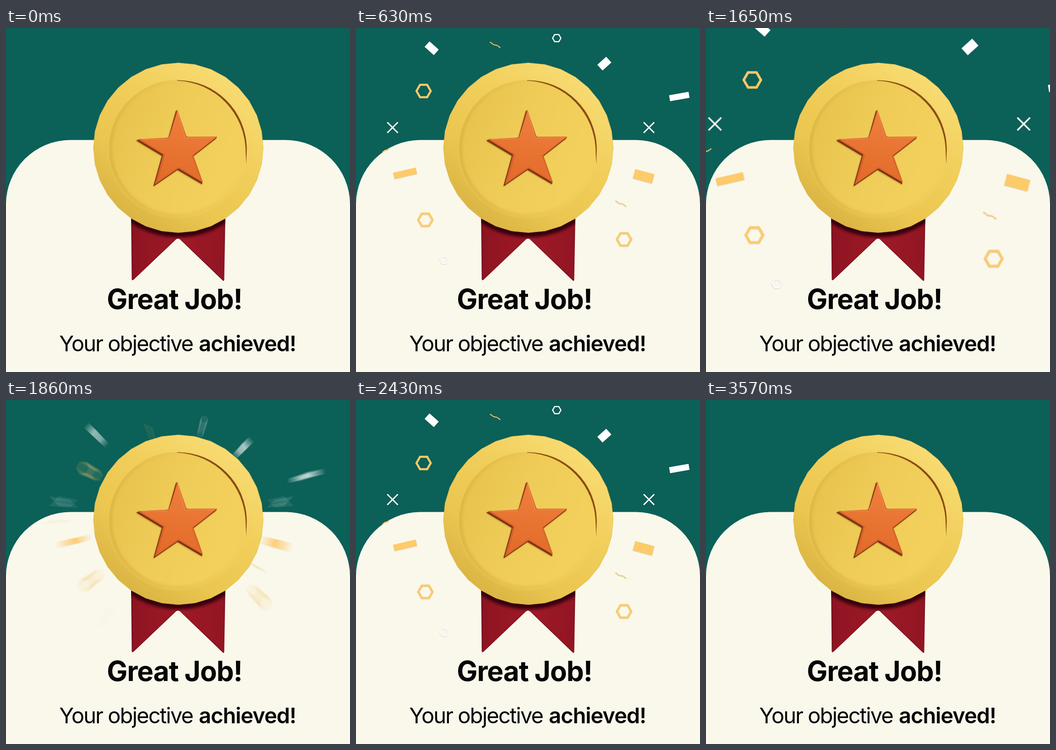
An HTML page with a canvas that plays this animation: 748 by 748 pixels, repeating every 3.6 s.

```html
<!DOCTYPE html>
<html lang="en">
<head>
<meta charset="utf-8">
<title>Great Job!</title>
<style>
  html, body { margin: 0; width: 100%; height: 100%; overflow: hidden; background: #0b6058; }
  canvas, svg { position: absolute; left: 0; top: 0; display: block; }
  text { font-family: Inter, "Liberation Sans", sans-serif; font-optical-sizing: none; fill: #050505; }
  .title { font-size: 60px; font-weight: 700; letter-spacing: -.018em; text-anchor: middle; }
  .line { font-size: 47px; letter-spacing: -.041em; }
  .strong { font-size: 47px; font-weight: 600; letter-spacing: -.024em; text-anchor: end; }
</style>
</head>
<body>
<svg width="748" height="748" viewBox="0 0 748 748">
  <rect y="243.600" width="748" height="700" rx="140" fill="#faf8eb"/>
</svg>
<canvas id="stage" width="748" height="748"></canvas>
<svg width="748" height="748" viewBox="0 0 748 748">
  <defs>
    <linearGradient id="rim" x1=".9" y1=".2" x2=".3" y2="1">
      <stop offset="0" stop-color="#f7da70"/>
      <stop offset=".35" stop-color="#f1ce5a"/>
      <stop offset=".7" stop-color="#ebc650"/>
      <stop offset="1" stop-color="#dab443"/>
    </linearGradient>
    <linearGradient id="floor" x1=".05" y1=".3" x2=".85" y2=".6">
      <stop offset="0" stop-color="#e8c44e"/>
      <stop offset=".5" stop-color="#efcc57"/>
      <stop offset="1" stop-color="#f2d05b"/>
    </linearGradient>
    <linearGradient id="lip" x1="0" y1=".7" x2="1" y2=".3">
      <stop offset="0" stop-color="#d2a536"/>
      <stop offset=".45" stop-color="#d9b040" stop-opacity=".6"/>
      <stop offset="1" stop-color="#f3d062" stop-opacity="0"/>
    </linearGradient>
    <linearGradient id="face" x1=".6" y1="0" x2=".4" y2="1">
      <stop offset="0" stop-color="#ee7f3c"/>
      <stop offset="1" stop-color="#e36b2a"/>
    </linearGradient>
    <linearGradient id="tailL" x1="272" x2="375" gradientUnits="userSpaceOnUse">
      <stop offset="0" stop-color="#6d0d1a"/>
      <stop offset=".05" stop-color="#8e1422"/>
      <stop offset="1" stop-color="#9e1926"/>
    </linearGradient>
    <linearGradient id="tailR" x1="375" x2="477" gradientUnits="userSpaceOnUse">
      <stop offset="0" stop-color="#a01a27"/>
      <stop offset=".96" stop-color="#921523"/>
      <stop offset="1" stop-color="#690c18"/>
    </linearGradient>
    <filter id="soft"><feGaussianBlur stdDeviation="3"/></filter>
    <filter id="fine"><feGaussianBlur stdDeviation=".9"/></filter>
    <path id="ribbon" d="M272 405H477L474.500 548Q474 551 471.500 549L380 461Q374 455 368 461L277 547.500Q273.500 550 273.400 546Z"/>
    <clipPath id="ribbonClip"><use href="#ribbon"/></clipPath>
    <path id="star" d="M372.500 178L391 233Q392 237 396 237L459 236.500L407 277L428 336L375 305L324 340L342 275L287 242L350 239Q355 238 357 233Z" stroke-linejoin="round"/>
  </defs>

  <g clip-path="url(#ribbonClip)">
    <path d="M270 400H375V555H270Z" fill="url(#tailL)"/>
    <path d="M374.500 400H480V555H374.500Z" fill="url(#tailR)"/>
    <path d="M368 461L277 548M380 461L473 550" fill="none" stroke="#6b0d1a" stroke-width="2"/>
    <circle cx="375" cy="268" r="187" fill="#35040d" filter="url(#soft)"/>
  </g>

  <polygon id="disc" fill="url(#rim)" stroke="#d9b243" stroke-width=".6"/>
  <circle cx="373" cy="262" r="149" fill="url(#floor)"/>
  <circle cx="373" cy="262" r="146" fill="none" stroke="url(#lip)" stroke-width="4" filter="url(#soft)"/>
  <circle cx="373" cy="262" r="151" fill="none" stroke="#f5d768" stroke-opacity=".35" stroke-width="3" filter="url(#fine)"/>
  <path d="M372 113.600A150 150 0 0 1 523.500 264L522.500 297L521 268A155 155 0 0 0 372 114.500Z" fill="#8a4c14"/>

  <use href="#star" x="-3" y="4" fill="#80521a" stroke="#80521a" stroke-width="2" opacity=".5" filter="url(#fine)"/>
  <use href="#star" x="-2" y="2.500" fill="#7d2f10" stroke="#7d2f10" stroke-width="2"/>
  <use href="#star" fill="#d5622a" stroke="#d5622a" stroke-width=".8"/>
  <path d="M373 182L390 239L455 238L404 278L425 333L375 302L330 334L346 275L294 243L353 241Z" fill="url(#face)"/>
  <path d="M373 181L390 239L456 238M294 242L353 241" fill="none" stroke="#f59c62" stroke-width="1.600" stroke-opacity=".7"/>

  <text class="title" x="366.500" y="611">Great Job!</text>
  <text class="line" x="115.800" y="703">Your objective</text>
  <text class="strong" x="630.500" y="703">achieved!</text>
</svg>
<script>
const SIZE = 748, CX = 374, CY = 255, PERIOD = 1800;
const GOLD = '#fdcb6a', WHITE = '#fff';
const ctx = document.getElementById('stage').getContext('2d');

function layer() {
  const c = document.createElement('canvas');
  c.width = c.height = SIZE;
  return c;
}

const ring = (n, r, x, y, start = 0) => Array.from({ length: n }, (_, i) => {
  const a = start + i * 2 * Math.PI / n;
  return [x + r * Math.cos(a), y + r * Math.sin(a)];
});

document.getElementById('disc').setAttribute('points', ring(32, 184.7, 374.7, 260.4, -Math.PI / 2).join(' '));

// All confetti at rest, drawn once.
const confetti = layer(), g = confetti.getContext('2d');
g.shadowColor = 'rgba(40,40,40,.25)';
g.shadowBlur = 1.5;
g.shadowOffsetX = -0.3;
g.shadowOffsetY = 0.6;

function slip(x, y, w, h, deg, color) {
  g.save();
  g.translate(x, y);
  g.rotate(deg * Math.PI / 180);
  g.fillStyle = color;
  g.fillRect(-w / 2, -h / 2, w, h);
  g.restore();
}

function line(path, color, width) {
  g.strokeStyle = color;
  g.lineWidth = width;
  g.stroke(path);
}

function hex(x, y, r, width, color) {
  const p = new Path2D();
  ring(6, r, x, y).forEach(q => p.lineTo(...q));
  p.closePath();
  line(p, color, width);
}

function cross(x, y) {
  const d = 11.5;
  line(new Path2D(`M${x - d} ${y - d}l23 23M${x + d} ${y - d}l-23 23`), WHITE, 3);
}

function squiggle(x, y, w, h) {
  line(new Path2D(`M${x} ${y}c${w * .2} 0 ${w * .25} ${h * .55} ${w * .5} ${h * .5}s${w * .35} ${h * .4} ${w * .5} ${h * .5}`), GOLD, 2);
}

slip(164.5, 44, 27, 16, 42, WHITE);
slip(540, 77.5, 26, 17, -42, WHITE);
slip(703, 149, 43, 13, -10, WHITE);
slip(107, 316, 50, 14, -13, GOLD);
slip(625.5, 322.5, 43, 21, 15, GOLD);
hex(147, 137, 15.5, 4.5, GOLD);
hex(151, 417, 15.5, 4.5, GOLD);
hex(583, 459.5, 15.5, 4.5, GOLD);
hex(436.5, 22, 9, 2.5, WHITE);
hex(192, 504.5, 8.7, 2.5, WHITE);
cross(79.5, 216.5);
cross(637, 216.5);
squiggle(291, 31, 23, 12);
squiggle(564, 376, 24, 12);
squiggle(57, 270, 16, -9);

function elastic(u) {
  if (u <= 0) return 0;
  if (u >= 1) return 1;
  return 1 - 2 ** (-10 * u) * Math.cos(4 * Math.PI * u);
}

// Springs out, rests, then springs back in mirrored time.
const spread = t => t < 1200 ? elastic(t / 600) : elastic((1770 - t) / 570);

const SAMPLES = 17, SHUTTER = 12;

function stamp(s) {
  if (s > 0) ctx.drawImage(confetti, CX * (1 - s), CY * (1 - s), SIZE * s, SIZE * s);
}

function draw() {
  const t = Math.floor(performance.now() / 30) * 30 % PERIOD;
  const from = spread(t - SHUTTER / 2), to = spread(t + SHUTTER / 2);
  ctx.globalCompositeOperation = 'source-over';
  ctx.globalAlpha = 1;
  ctx.clearRect(0, 0, SIZE, SIZE);
  if (Math.abs(to - from) < 0.0008) {
    stamp(spread(t));
  } else {
    // Average the poses over the shutter time for motion blur.
    ctx.globalCompositeOperation = 'lighter';
    ctx.globalAlpha = 1 / SAMPLES;
    for (let i = 0; i < SAMPLES; i++) stamp(spread(t + SHUTTER * (i / (SAMPLES - 1) - 0.5)));
  }
  requestAnimationFrame(draw);
}
draw();
</script>
</body>
</html>
```
